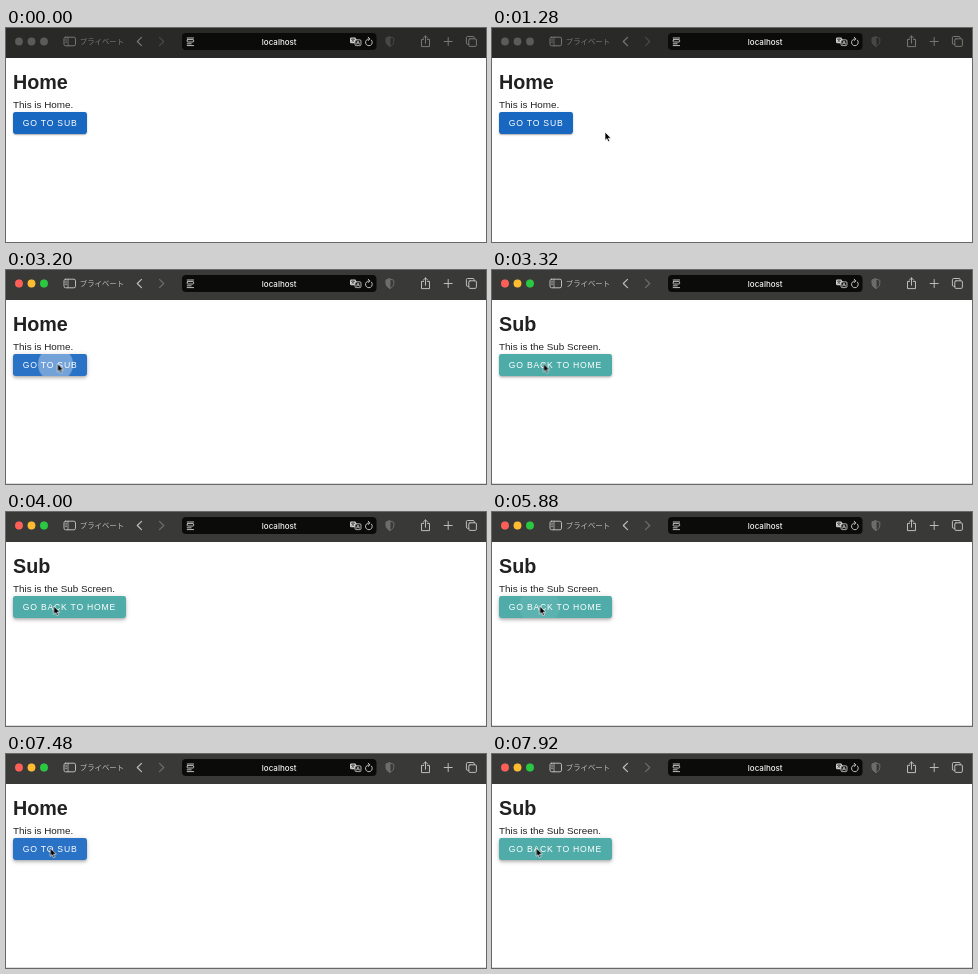
Recreate the animation shown at these times as an HTML page. Size 480 by 214 pixels, loop 8000 ms.

```html
<!DOCTYPE html>
<html lang="en">
<head>
<meta charset="utf-8">
<title>Page navigation</title>
<style>
  :root {
    --u: .617px;
    --rest: 0 1.85px .62px -1.23px #0003, 0 1.23px 1.23px #00000024, 0 .62px 3.1px #0000001f;
    --raised: 0 1.23px 2.47px -.62px #0003, 0 2.47px 3.1px #00000024, 0 .62px 6.2px #0000001f;
    --decelerate: cubic-bezier(0, 0, .2, 1);
  }
  html, body { margin: 0; width: 100%; height: 100%; overflow: hidden; background: #fff; }
  body { position: relative; font-family: "Liberation Sans", Arial, sans-serif; color: #212121; }
  svg { position: absolute; left: 0; top: 0; overflow: hidden; }

  /* Browser toolbar */
  .bar { color: #777775; animation: activate 8s step-end infinite; }
  .bar .back { fill: #292927; animation: bar-back 8s step-end infinite; }
  .active { visibility: hidden; animation: appear 8s step-end infinite; }
  .icon { fill: none; stroke: currentColor; stroke-width: 1; stroke-linecap: round; stroke-linejoin: round; }
  .faint { opacity: .4; }
  .field { color: #d2d2d2; }
  .private { font: 500 7.4px "Noto Sans CJK JP", "Noto Sans CJK", sans-serif; fill: currentColor; }
  .address { font: 500 8px Inter, sans-serif; fill: #f4f4f4; text-anchor: middle; }
  @keyframes activate { 23%, 100% { color: #bcbcba; } }
  @keyframes bar-back { 23%, 100% { fill: #393938; } }
  @keyframes appear { 23%, 100% { visibility: visible; } }

  /* Pages */
  .page { position: absolute; left: 7px; top: 0; }
  .home { animation: home-page 8s step-end infinite; }
  .sub { animation: sub-page 8s step-end infinite; }
  @keyframes home-page {
    0%, 75% { visibility: visible; }
    40.5%, 95.5%, 100% { visibility: hidden; }
  }
  @keyframes sub-page {
    0%, 75% { visibility: hidden; }
    40.5%, 95.5%, 100% { visibility: visible; }
  }
  h1, p { position: absolute; left: 0; margin: 0; white-space: nowrap; }
  h1 { top: 43px; font-size: calc(32 * var(--u)); line-height: 23px; }
  p { top: 70.5px; font-size: calc(16 * var(--u)); line-height: 12px; }
  .button {
    position: absolute; left: 0; top: 84px; box-sizing: border-box;
    height: calc(36 * var(--u)); padding: 0 calc(16 * var(--u));
    border-radius: calc(4 * var(--u)); box-shadow: var(--rest);
    font-size: calc(14 * var(--u)); line-height: calc(36 * var(--u));
    letter-spacing: .0893em; white-space: nowrap; color: #fff;
  }
  .home .button { background: #1867c0; animation: home-lift 8s infinite; }
  .sub .button { background: #48a9a6; animation: sub-lift 8s infinite; }
  .button::before {
    content: ""; position: absolute; inset: 0; border-radius: inherit; background: #fff; opacity: 0;
  }
  .home .button::before { animation: home-hover 8s infinite; }
  .sub .button::before { animation: sub-hover 8s infinite; }
  .button span { position: relative; }
  @keyframes home-lift {
    0%, 27.5%, 75% { box-shadow: var(--rest); }
    31%, 74.99%, 78.5%, 100% { box-shadow: var(--raised); }
  }
  @keyframes sub-lift {
    0%, 40.5%, 95.5% { box-shadow: var(--rest); }
    44%, 95.49%, 99%, 100% { box-shadow: var(--raised); }
  }
  @keyframes home-hover {
    0%, 27.5%, 75% { opacity: 0; }
    30%, 74.99%, 77.5%, 100% { opacity: .08; }
  }
  @keyframes sub-hover {
    0%, 40.5%, 95.5% { opacity: 0; }
    43%, 95.49%, 98%, 100% { opacity: .04; }
  }

  /* Press ripples */
  .clip { position: absolute; inset: 0; overflow: hidden; border-radius: inherit; }
  .clip i {
    position: absolute; left: 50%; top: 50%; width: var(--d); height: var(--d);
    margin: calc(var(--d) / -2); border-radius: 50%; background: #fff; opacity: 0;
  }
  .home i { --d: 78px; animation: home-grow 8s infinite, home-glow 8s infinite; }
  .sub i { --d: 116px; animation: sub-grow 8s infinite, sub-glow 8s infinite; }
  @keyframes home-grow {
    0% { transform: translate(7px, -1px) scale(.3); }
    39.5% { transform: translate(7px, -1px) scale(.3); animation-timing-function: var(--decelerate); }
    42.625%, 75% { transform: none; }
    75.01% { transform: translate(0, -1px) scale(.3); }
    93.625% { transform: translate(0, -1px) scale(.3); animation-timing-function: var(--decelerate); }
    96.75%, 100% { transform: none; }
  }
  @keyframes home-glow {
    0% { opacity: 0; }
    39.5%, 93.625% { opacity: 0; animation-timing-function: var(--decelerate); }
    40.75%, 94.875%, 100% { opacity: .5; }
    42%, 75% { opacity: 0; }
  }
  @keyframes sub-grow {
    0% { transform: translate(-16.5px, -1px) scale(.3); }
    73.25% { transform: translate(-16.5px, -1px) scale(.3); animation-timing-function: var(--decelerate); }
    76.375%, 100% { transform: none; }
  }
  @keyframes sub-glow {
    0% { opacity: 0; }
    73.25% { opacity: 0; animation-timing-function: var(--decelerate); }
    74.5%, 75% { opacity: .25; }
    75.01%, 100% { opacity: 0; }
  }

  /* Pointer */
  .pointer { animation: travel 8s ease-in-out infinite, enter 8s step-end infinite; }
  .arrow { animation: arrow 8s step-end infinite; }
  .hand { opacity: 0; animation: hand 8s step-end infinite; }
  @keyframes travel {
    0%, 11% { transform: translate(235px, 203px); }
    13%, 23% { transform: translate(113px, 104px); }
    27%, 28% { transform: translate(55.5px, 90px); }
    33%, 47% { transform: translate(51.5px, 93.5px); }
    50%, 82.5% { transform: translate(47.7px, 94px); }
    93%, 100% { transform: translate(44.3px, 94px); }
  }
  @keyframes enter {
    0% { visibility: hidden; }
    9%, 100% { visibility: visible; }
  }
  @keyframes arrow {
    0%, 30.5%, 100% { opacity: 1; }
    26.5% { opacity: 0; }
  }
  @keyframes hand {
    0%, 30.5%, 100% { opacity: 0; }
    26.5% { opacity: 1; }
  }
</style>
</head>
<body>
  <section class="page home">
    <h1>Home</h1>
    <p>This is Home.</p>
    <div class="button"><div class="clip"><i></i></div><span>GO TO SUB</span></div>
  </section>
  <section class="page sub">
    <h1>Sub</h1>
    <p>This is the Sub Screen.</p>
    <div class="button"><div class="clip"><i></i></div><span>GO BACK TO HOME</span></div>
  </section>

  <svg width="480" height="214" viewBox="0 0 480 214">
    <g class="bar">
      <rect class="back" width="480" height="30"/>
      <g fill="#5b5b59">
        <circle cx="13" cy="13.5" r="3.9"/><circle cx="25.5" cy="13.5" r="3.9"/><circle cx="38" cy="13.5" r="3.9"/>
      </g>
      <g class="active">
        <circle cx="13" cy="13.5" r="3.9" fill="#ff5f57"/>
        <circle cx="25.5" cy="13.5" r="3.9" fill="#febc2e"/>
        <circle cx="38" cy="13.5" r="3.9" fill="#28c840"/>
        <rect y="213" width="480" height="1" fill="#dcdcdc"/>
      </g>
      <g class="icon">
        <rect x="58" y="9.2" width="11.5" height="8.6" rx="1.6"/>
        <path d="M62 9.2v8.6M59.6 11.2h.9M59.6 12.9h.9M59.6 14.6h.9" stroke-width=".8"/>
        <path d="M135.5 9.3l-4.2 4.2 4.2 4.2" stroke-width="1.2"/>
        <path class="faint" d="M153.5 9.3l4.2 4.2-4.2 4.2" stroke-width="1.2"/>
        <path d="M417.6 11.4h-2.1v7.2h8v-7.2h-2.1M419.5 15.2V8M417.4 10l2.1-2.1 2.1 2.1"/>
        <path d="M438.2 13.5h8M442.2 9.5v8"/>
        <path d="M462.8 16.3h-1.2a1.2 1.2 0 0 1-1.2-1.2V9.7a1.2 1.2 0 0 1 1.2-1.2h5.4a1.2 1.2 0 0 1 1.2 1.2v1"/>
        <rect x="462.8" y="10.8" width="7.6" height="7.6" rx="1.2"/>
      </g>
      <g class="icon faint">
        <path d="M384 9l3.8 1.3v3.2c0 2.3-1.5 3.8-3.8 4.9-2.3-1.1-3.8-2.6-3.8-4.9v-3.2z"/>
        <path d="M384 9v9.4c-2.3-1.1-3.8-2.6-3.8-4.9v-3.2z" fill="currentColor"/>
      </g>
      <text class="private" x="73.8" y="16.4">プライベート</text>

      <rect x="176" y="5" width="194.5" height="17" rx="4" fill="#0b0b0a"/>
      <g class="icon field">
        <path d="M181.2 10h6.4M181.2 17.6h6.4M181.2 15.8h4" stroke-width=".9"/>
        <rect x="181.2" y="11.6" width="6.4" height="2.4" rx=".5" stroke-width=".9"/>
        <rect x="344" y="9.5" width="6" height="5.8" rx="1.2" fill="currentColor" stroke="none"/>
        <path d="M345.4 11.2h3.2M347 10.5v.7M348.2 11.4l-2.6 2.6M345.8 11.8l2.6 2.2" stroke="#222" stroke-width=".6"/>
        <rect x="349" y="11.8" width="6" height="5.8" rx="1.2" fill="#171716" stroke-width=".8"/>
        <path d="M350.6 16.2l1.4-3.2 1.4 3.2M351.1 15.2h1.8" stroke-width=".7"/>
        <path d="M365.5 12.1a3.4 3.4 0 1 1-2.6-1.2M362.2 9.2l1.7 1.7-1.7 1.7" stroke-width=".9"/>
      </g>
      <text class="address" x="273.2" y="16.5">localhost</text>
    </g>

    <g class="pointer" stroke-linejoin="round">
      <path class="arrow" d="M0 0v8.4l1.9-1.7 1.3 3 1.5-.7-1.3-2.8h2.6z" fill="#000" stroke="#fff" stroke-width=".7"/>
      <path class="hand" d="M-1.1.8q.8-1.3 1.6 0l.4 2.9.7-.6q1-.2 1.2.7 1.1-.4 1.4.6 1.1-.1 1 1l-.6 2.6-.9 2H-.3L-2.9 6.1q-.8-1.3.5-1.4l1.5 1z" fill="#fff" stroke="#111" stroke-width=".7"/>
    </g>
  </svg>
</body>
</html>
```
